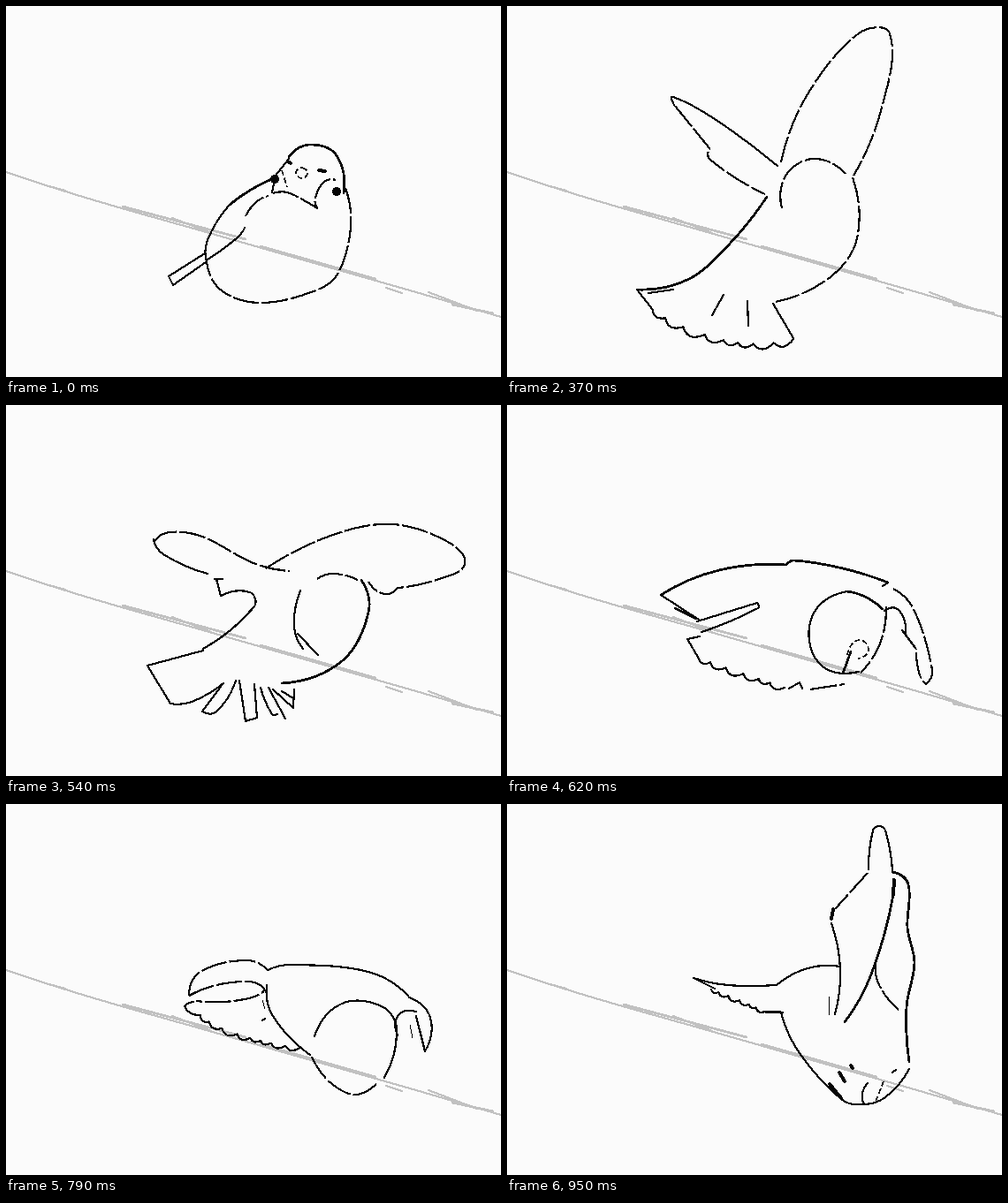
Recreate the animation shown at these times as an HTML page. Size 560 by 420 pixels, loop 1.66 s.

```html
<!DOCTYPE html>
<html lang="en">
<head>
<meta charset="utf-8">
<title>Bird on a wire</title>
<style>
  html, body { margin: 0; width: 100%; height: 100%; overflow: hidden; background: #fbfbfb; }
  svg { display: block; width: 100%; height: 100%; }
  path { fill: none; stroke-width: 2.2; stroke-linecap: round; stroke-linejoin: round; }
  .wire { stroke: #c1c1c1; }
  .pose { stroke: #050505; visibility: hidden; }
  .h { stroke-width: 1; }
  .b { stroke-width: 2.8; }
  .B { stroke-width: 4; }
  .X { stroke-width: 10; }
  .d { stroke-dasharray: 30 3; stroke-linecap: butt; }
  .t { stroke-width: 1.7; stroke-dasharray: 6 3; stroke-linecap: butt; }
</style>
</head>
<body>
<svg id="stage" viewBox="0 0 560 420" shape-rendering="crispEdges"></svg>
<script>
const LOOP = 1660;

// One stroke per "/": an optional pen letter (see the styles), then points.
// "!" makes a corner, "s" and a count draws a scalloped feather edge.
const wire = `0,188 90,217 230,257 345,290 450,320 560,352 / 45,203 67,209
  / b 132,227 271,264 / 188,240 232,257 / b 288,272 418,309
  / 430,319 448,325 / 478,324 533,345 / b 505,338 551,348`;

const perched = `b 320,171 343,157 373,168 382,212
  / d 384,206 390,250 376,302 353,321 290,336 245,323 227,290
  / 320,173 304,193 / b 303,195 277,208 253,225 / 253,225 228,265 227,290
  / 225,280 184,306! 189,316! 226,290
  / 270,251 262,262 228,287 / d 271,238 283,222 297,215
  / t 312,186 318,205 / 301,211 304,196
  / d 302,212 318,211 337,220 352,229! 350,217 360,199 373,197
  / t 335,183 341,189 335,195 328,189 335,183
  / B 319,176 322,178 / B 354,186 361,187 / X 304,196 / X 374,210`;

const lift = `d 314,170 318,140 341,90! 374,140 386,212 / h 306,118 309,130
  / b 189,193 241,155 290,143 308,158 309,200 / 249,147 292,142
  / 197,196 229,191! 238,222! 258,224 293,217
  / d 310,200 345,169 380,192 / X 318,221
  / 350,222 359,217 368,221 360,228 350,222
  / t 342,236 353,252 374,234 / t 375,211 382,228
  / b 293,217 263,240! 256,262 230,299 205,311 150,318 / 150,320 180,320 235,303
  / b 385,224 395,255 388,286 / 388,286 345,319 307,333
  / s9 172,322 217,362 283,370 322,370 / 325,368 324,353
  / 296,335 323,367 / 286,331 300,350 / t 245,306 255,315 273,319`;

const upstroke = `d 310,177 340,100 398,31 433,31 424,115 392,192
  / 189,112 188,103 235,128 306,181 / d 190,113 229,161! 230,174 292,213
  / d 311,229 316,191 347,173 383,190 / b 294,216 253,268 206,309 147,321
  / d 391,194 396,263 367,306 304,335
  / 147,321 165,344 / s8 165,344 206,366 268,382 324,377 / 160,325 188,321
  / 245,327 232,350 / 272,334 273,362 / 301,337 324,376`;

const spread = `b 207,88 211,80 262,145 317,192 / 209,90 257,157! 264,180 279,196
  / b 291,168 345,116 410,82 / B 404,83 460,70 / b 460,70 484,83 440,152 398,192
  / 313,152 338,123 372,99 / d 290,170 299,150 307,149 / t 295,170 316,179
  / d 323,260 311,225 335,181 383,179 / 279,195 275,212 279,226
  / b 304,214 280,230 228,290 146,323
  / 398,192 405,225 403,244 / b 402,250 376,296 300,335 / 400,250 390,266
  / 146,323 158,335! 190,324 / s5 158,335 180,350 211,365 / 165,339 178,329
  / 213,364 244,333 / 256,331 237,367 / b 255,334 253,367 / 262,340 262,368
  / 271,341 272,372 / 287,346 298,375 / 304,346 323,374 / d 236,367 272,379 300,375`;

const glide = `d 167,155 185,144 222,149 280,179 321,188 / 167,152 178,169 228,191
  / 236,197 245,197 / 238,197 243,216! 276,212 281,228 223,276
  / d 294,185 370,147 437,135 500,155 519,180 490,197 443,207! 428,214 410,200
  / d 352,197 370,191 398,198 / 333,210 326,250 336,276 / 330,259 353,283
  / b 402,198 410,235 380,290 312,315
  / 223,278 160,295! 186,338! 210,336 246,315
  / 245,316 222,347! 238,347 260,312 / 264,312 271,358! 284,354! 281,316
  / 288,320 301,350 307,350 / 297,320 316,355 / 302,322 325,343! 326,322 / 312,324 325,332`;

const fold = `b 174,215 240,187 316,181! 325,176 380,185 431,201 / 431,201 425,205
  / d 437,208 460,231 481,300 474,316! 466,303 463,276 / 462,275 447,255
  / 451,259 443,232 427,233 / 174,215 217,243 / b 190,230 214,242
  / 215,245 283,224! 284,230 220,257
  / 384,211 345,240 352,291 398,302 / b 384,211 405,217 425,231 / d 429,228 422,270 400,303
  / b 380,304 389,279 / t 385,283 398,266 409,277 397,287
  / 218,262 204,265! 217,287 / s6 217,287 258,301 314,320
  / 319,321 331,314! 334,321 / d 343,322 382,316`;

const tuck = `d 190,216 235,184 324,179 421,193 473,242 474,298! 464,262 437,234
  / 190,216 210,231! 283,211! 278,225 213,240 / 292,209 308,247 342,277
  / d 345,273 363,230 404,219 434,250 405,314 360,306 345,273
  / 213,240 204,250 216,256 / s8 216,256 274,287 350,294`;

const crouch = `d 207,217 220,190 272,177 297,189 / 296,188 323,182 410,190 455,217
  / 456,219 480,242 474,280! 464,240 / 464,235 444,239 443,262 / h 457,250 460,265
  / d 207,217 255,202 291,208 270,221 215,223 / 212,224 203,231 220,239
  / 295,205 302,240 344,284 / h 290,222 293,232 / 290,245 293,243
  / 349,263 380,226 425,229 442,255 428,310 / d 419,317 385,327 345,284
  / s8 220,240 260,260 332,276`;

const rise = `d 306,190 357,181 397,159! 427,99 449,97 464,174 457,232
  / 433,119 417,182 390,228 / 382,191 378,222
  / 303,209 311,247 357,315 411,336 450,295 455,234
  / d 359,270 384,241 430,245 / B 373,317 377,320 / 400,336 403,321 411,317
  / 206,205 244,190 306,199 / 206,206 229,211 / s6 229,211 263,230 310,246`;

const bow = `409,74 414,30 421,25 428,30 436,75 / d 408,78 371,119 / B 369,119 367,130
  / 367,135 377,187 371,238 / h 364,218 364,239
  / B 438,86 437,103 / b 437,103 412,193 382,247
  / b 436,77 454,91 453,140 461,180 452,230 455,292 / d 417,180 421,205 443,233
  / 377,184 340,186 305,205 / 303,205 250,205 211,197
  / 211,197 235,209 / s6 231,210 262,222 292,235 / b 290,235 312,236
  / 310,236 331,282 378,334 402,340 / 402,340 428,332 455,300 / B 365,317 378,333
  / B 376,304 382,314 / B 389,296 391,299
  / 404,340 402,328 408,316 / t 426,314 417,337 / 436,304 440,301`;

const steps = [
  [0, perched], [290, lift], [370, upstroke], [450, spread], [540, glide],
  [620, fold], [700, tuck], [790, crouch], [870, rise], [950, bow]
];

const NS = "http://www.w3.org/2000/svg";
const stage = document.getElementById("stage");

function make(tag, parent, className) {
  const el = document.createElementNS(NS, tag);
  el.setAttribute("class", className);
  return parent.appendChild(el);
}

const add = (a, b, k) => [a[0] + b[0] * k, a[1] + b[1] * k];
const sub = (a, b) => add(a, b, -1);
const size = v => Math.hypot(v[0], v[1]) || 1;

// Smooth curve through all points, sharp at corners.
function curve(pts) {
  let d = "M" + pts[0].xy;
  if (pts.length === 1) return d + "h0";
  const tangent = i => {
    if (i === 0 || i === pts.length - 1 || pts[i].corner) return null;
    const v = sub(pts[i + 1].xy, pts[i - 1].xy);
    return v.map(n => n / size(v));
  };
  for (let i = 0; i < pts.length - 1; i++) {
    const a = pts[i].xy, b = pts[i + 1].xy;
    const ab = sub(b, a), reach = size(ab) / 3;
    const ta = tangent(i), tb = tangent(i + 1);
    let c1 = ta && add(a, ta, reach);
    let c2 = tb && add(b, tb, -reach);
    c1 = c1 || (c2 ? add(c2, ab, -1 / 3) : a);
    c2 = c2 || (ta ? add(c1, ab, 1 / 3) : b);
    d += `C${c1} ${c2} ${b}`;
  }
  return d;
}

// Replaces a smooth edge by a row of uneven feather tips.
function scallop(path, count) {
  const total = path.getTotalLength();
  const at = i => {
    const shift = i > 0 && i < count ? 0.2 * Math.sin(i * 5) : 0;
    const p = path.getPointAtLength(total * (i + shift) / count);
    return [p.x, p.y];
  };
  let a = at(0), d = "M" + a;
  for (let i = 1; i <= count; i++) {
    const b = at(i), [dx, dy] = sub(b, a);
    const ctrl = add(add(a, [dx, dy], 0.4), [-dy, dx], 0.55);
    d += `Q${ctrl} ${b}`;
    a = b;
  }
  path.setAttribute("d", d);
}

function sketch(text, name) {
  const group = make("g", stage, name);
  for (const stroke of text.split("/")) {
    const words = stroke.trim().split(/\s+/);
    const pen = /^[a-z]/i.test(words[0]) ? words.shift() : "";
    const pts = words.map(w => ({ xy: w.split(",").map(parseFloat), corner: w.endsWith("!") }));
    const path = make("path", group, pen);
    path.setAttribute("d", curve(pts));
    if (pen[0] === "s") scallop(path, +pen.slice(1));
  }
  return group;
}

sketch(wire, "wire");
const poses = steps.map(([at, text]) => ({ at, group: sketch(text, "pose") }));

let shown = null;
function show(time) {
  const pose = poses.filter(p => p.at <= time).pop();
  if (pose === shown) return;
  if (shown) shown.group.style.visibility = "hidden";
  pose.group.style.visibility = "visible";
  shown = pose;
}

const start = performance.now();
function tick() {
  show((performance.now() - start) % LOOP);
  requestAnimationFrame(tick);
}
tick();
</script>
</body>
</html>
```
